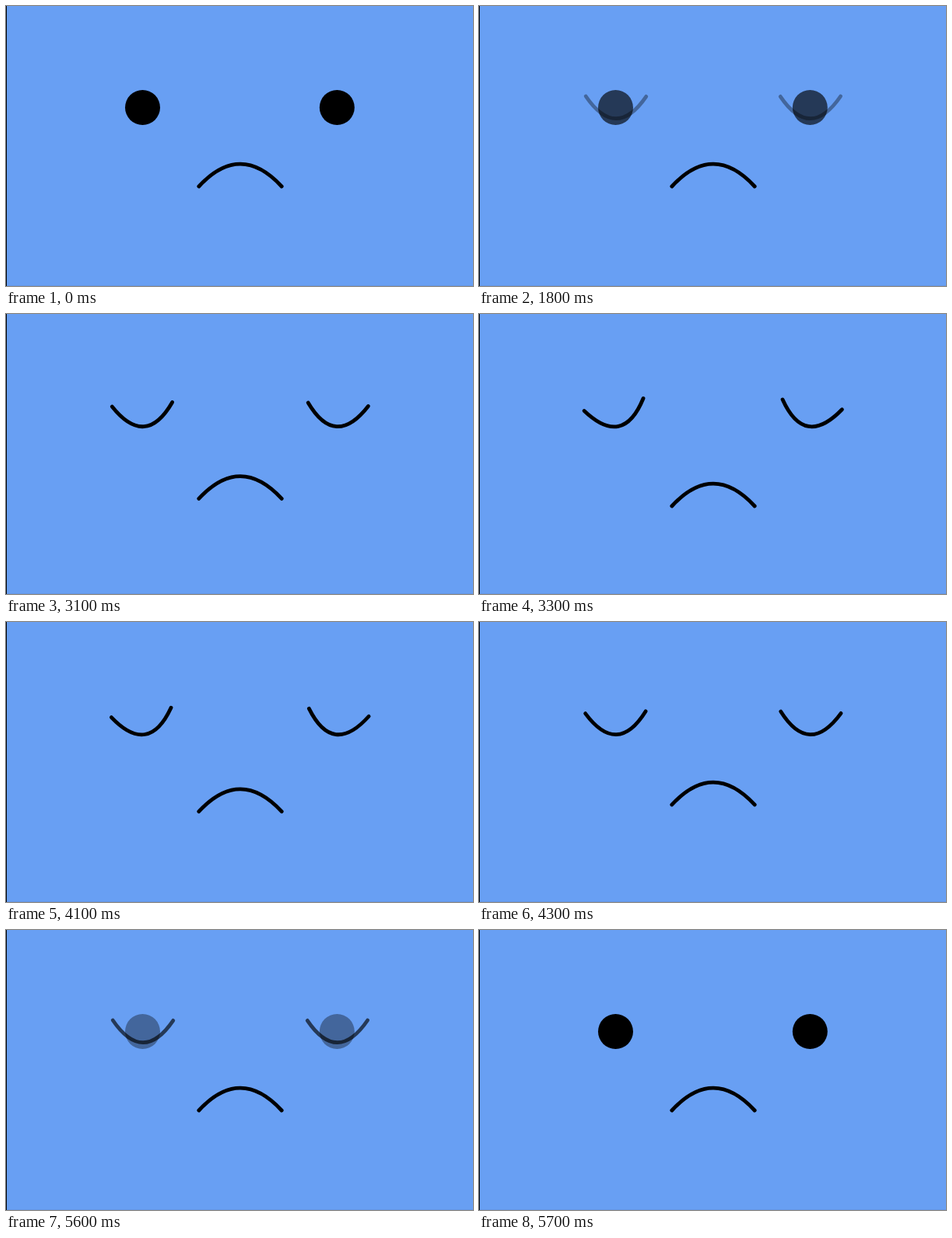
These frames come from a looping animation (600 by 360 pixels, 5800 ms). An HTML page:

```html
<!DOCTYPE html>
<html lang="en">
<head>
<meta charset="utf-8">
<title>Sad face</title>
<style>
  html, body { margin: 0; width: 100%; height: 100%; overflow: hidden; background: #689ff3; }
  svg { display: block; width: 600px; height: 360px; }
  .line { fill: none; stroke: #000; stroke-width: 4.8; stroke-linecap: round; }
</style>
</head>
<body>
<svg viewBox="0 0 600 360">
  <rect width="600" height="360" fill="#689ff3"/>
  <rect y="359" width="600" height="1" fill="#6496e5"/>
  <rect width="1" height="360"/>
  <g id="open">
    <circle cx="175.5" cy="130.5" r="22.5"/>
    <circle cx="425.3" cy="130.5" r="22.5"/>
  </g>
  <g id="closed" class="line">
    <path id="leftLid" d="M137.2 116Q176 173.2 214.8 116.4"/>
    <path id="rightLid" d="M387.2 116.4Q425.6 173.2 464.6 116"/>
  </g>
  <path id="mouth" class="line" d="M247.8 232Q301 174.4 354.2 232"/>
</svg>
<script>
const LOOP = 5800;
const STEP = 100;
const FADE_START = 0.36;
const $ = id => document.getElementById(id);
const clamp = v => Math.min(1, Math.max(0, v));
const progress = (time, start, duration) => clamp((time - start) / duration);

// Cubic Bezier easing (.25, .1, .25, 1), solved by bisection.
function ease(x) {
  const bezier = (s, a, b) => 3 * s * (1 - s) ** 2 * a + 3 * s * s * (1 - s) * b + s ** 3;
  let low = 0, high = 1;
  for (let i = 0; i < 24; i++) {
    const mid = (low + high) / 2;
    if (bezier(mid, 0.25, 0.25) < x) low = mid; else high = mid;
  }
  return bezier(high, 0.1, 1);
}

function fade(time, start) {
  if (time < start) return 0;
  return time < start + STEP ? FADE_START : 1;
}

function droopAt(time) {
  return time < 4000 ? progress(time, 2600, 700) ** 3 : 1 - ease(progress(time, 4000, 600));
}

function render(now) {
  const time = Math.floor((now % LOOP) / STEP) * STEP;
  const closed = fade(time, 1800) - fade(time, 5600);
  const droop = droopAt(time);
  $("open").setAttribute("opacity", 1 - closed);
  $("closed").setAttribute("opacity", closed);
  $("leftLid").setAttribute("transform", `rotate(${-12.2 * droop} 176 130)`);
  $("rightLid").setAttribute("transform", `rotate(${9.8 * droop} 426 130)`);
  $("mouth").setAttribute("transform", `translate(0 ${15 * droop})`);
}

const start = performance.now();
function tick() {
  render(performance.now() - start);
  requestAnimationFrame(tick);
}
tick();
</script>
</body>
</html>
```
